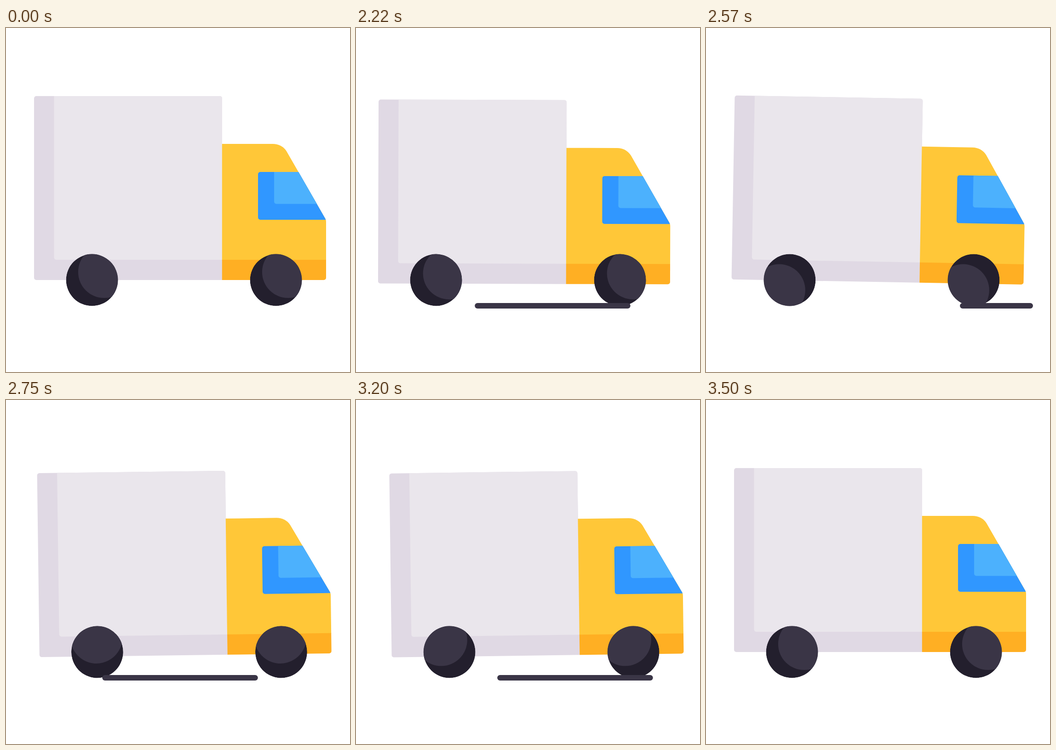
An HTML page for the animation above (3.52 s loop, 748 px wide and 748 px high).

```html
<!DOCTYPE html>
<html lang="en">
<head>
<meta charset="utf-8">
<title>Delivery truck</title>
<style>
  html, body { margin: 0; width: 100%; height: 100%; overflow: hidden; background: #fff; }
  svg { display: block; width: 100%; height: 100%; }
</style>
</head>
<body>
<svg viewBox="0 0 748 748">
  <defs>
    <clipPath id="rim"><circle r="56.4"/></clipPath>
    <g id="wheel" clip-path="url(#rim)">
      <circle r="56.4" fill="#231f2d"/>
      <circle cx="26.5" cy="-17.5" r="56.6" fill="#3a3546"/>
    </g>
  </defs>
  <g id="body">
    <path fill="#e0d9e4" d="M66 148H465a5 5 0 0 1 5 5V548H66a5 5 0 0 1-5-5V153a5 5 0 0 1 5-5Z"/>
    <path fill="#eae6ec" d="M104.500 148H465a5 5 0 0 1 5 5V504H109.500a5 5 0 0 1-5-5Z"/>
    <path fill="#ffc738" d="M469.800 252H580C592 252 603.500 257.500 610 268L694 414Q696 417.500 696 421V505H469.800Z"/>
    <path fill="#ffaf23" d="M469.800 504H696V543a5 5 0 0 1-5 5H469.800Z"/>
    <path fill="#3097ff" d="M636 313H553a5 5 0 0 0-5 5V412a5 5 0 0 0 5 5H695.300Q695 415.500 694 414Z"/>
    <path fill="#4cb1fd" d="M583 313H636L676 382.500H588a5 5 0 0 1-5-5Z"/>
  </g>
  <g id="wheels">
    <g transform="translate(187 548)"><use class="spin" href="#wheel"/></g>
    <g transform="translate(587 548)"><use class="spin" href="#wheel"/></g>
  </g>
  <path id="road" stroke="#3a3546" stroke-width="12" stroke-linecap="round"/>
</svg>
<script>
  const LOOP = 3520, REST = 2020, LAST = 60;
  const $ = id => document.getElementById(id);
  const body = $('body'), wheels = $('wheels'), road = $('road');
  const spins = document.querySelectorAll('.spin');

  // keys: [step, value] pairs, eased in and out between neighbours
  const SHIFT = [[0, 0], [13.5, -17.5], [40, 25], [60, 0]];
  const BOUNCE = [[0, 0], [9.5, 8.3], [19, 0], [28.5, 8.3], [38, 0], [48, 8.3], [60, 0]];
  const TILT = [[0, 0], [5, 1], [14, -1], [23, 1], [32, -1], [41, 1], [50, -1], [60, 0]];
  const SPIN = [[0, 0], [6, 0], [60, 720]];

  const clamp = x => Math.min(1, Math.max(0, x));
  const smooth = x => x * x * (3 - 2 * x);

  function ease(keys, k) {
    const i = Math.max(1, keys.findIndex(([at]) => at >= k));
    const [a, from] = keys[i - 1], [b, to] = keys[i];
    return from + (to - from) * smooth((k - a) / (b - a));
  }

  // steps last 30 and 20 ms in turn
  function stepAt(ms) {
    const t = ms - REST;
    if (t < 0) return 0;
    return Math.min(LAST, 1 + 2 * Math.floor(t / 50) + (t % 50 >= 30 ? 1 : 0));
  }

  // a half-length dash runs from right to left, three times
  function drawRoad(k) {
    const run = (k % 20) * 0.075;
    const head = clamp(run), tail = clamp(run - 0.5);
    const x = p => 705 - 653 * p;
    road.setAttribute('d', head > tail ? `M${x(tail)} 604H${x(head)}` : '');
  }

  function draw(ms) {
    const k = stepAt(ms), dx = ease(SHIFT, k);
    body.setAttribute('transform',
      `translate(${dx} ${ease(BOUNCE, k)}) rotate(${ease(TILT, k)} 320 519)`);
    wheels.setAttribute('transform', `translate(${dx} 0)`);
    spins.forEach(s => s.setAttribute('transform', `rotate(${ease(SPIN, k)})`));
    drawRoad(k);
  }

  const start = performance.now();
  function tick() {
    draw((performance.now() - start) % LOOP);
    requestAnimationFrame(tick);
  }
  tick();
</script>
</body>
</html>
```
